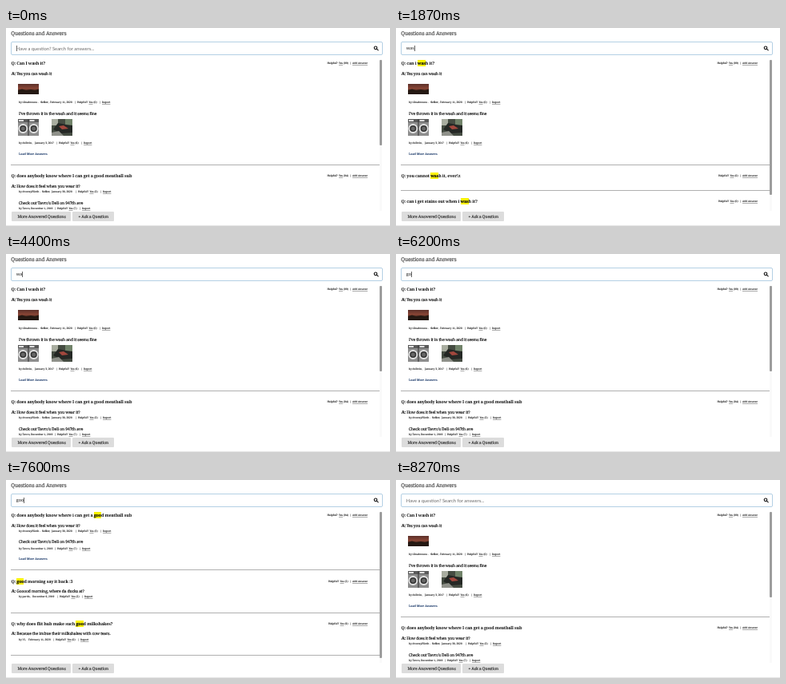
Recreate the animation shown at these times as an HTML page. Size 480x248 px, loop 8540 ms.

```html
<!DOCTYPE html>
<html lang="en">
<head>
<meta charset="utf-8">
<title>Questions and Answers</title>
<style>
html, body { margin: 0; width: 100%; height: 100%; overflow: hidden; background: #fff; }
#stage { position: relative; width: 480px; height: 248px; overflow: hidden; text-rendering: geometricPrecision; }
#stage div, #stage p, #stage svg { position: absolute; margin: 0; }
p { white-space: pre; line-height: 8px; font: 400 5px/8px "Noto Serif", serif; letter-spacing: -.12px; color: #111; }
p.title { font-size: 6.5px; letter-spacing: -.16px; color: #555; -webkit-text-stroke: .22px #555; }
p.q, p.a b { font-weight: 600; font-size: 5.4px; letter-spacing: -.16px; }
p.a { -webkit-text-stroke: .16px #111; }
p.m { font-size: 3.25px; letter-spacing: 0; color: #111; -webkit-text-stroke: .08px #111; }
p.load { font-size: 3.75px; letter-spacing: 0; color: #23406f; -webkit-text-stroke: .14px #23406f; }
u { text-decoration: underline .35px #aaa; text-underline-offset: .7px; text-decoration-skip-ink: none; }
mark { background: #fbf300; color: inherit; -webkit-text-stroke: .15px #111; }
#box { left: 6px; top: 17px; width: 463px; height: 15px; border: 1px solid #b4d0e4; border-radius: 2px; }
#field { left: 12.8px; top: 21.6px; font: 5.82px/8px Lato, sans-serif; letter-spacing: 0; color: #222; }
#caret { display: inline-block; width: .8px; height: 7px; margin-right: -.8px; vertical-align: -1.5px; background: #666; }
#hint { color: #666; }
#list { left: 0; top: 0; width: 480px; height: 229px; overflow: hidden; }
.rule { left: 6px; width: 461px; height: 1px; background: #b0b0b0; }
#track { left: 467px; top: 40px; width: 3px; height: 189px; background: #fafafa; }
#thumb { width: 3px; background: #9d9d9d; border-radius: 1px; }
.btn { top: 230px; height: 12px; background: #dcdcdc; border-radius: 1px; }
.btn p { left: 7.5px; top: 2.6px; color: #333; -webkit-text-stroke: .16px #333; }
#floor { left: 0; top: 247px; width: 480px; height: 1px; background: #e6e6e6; }
</style>
</head>
<body>
<div id="stage">
  <p class="title" style="left:6.3px;top:2.5px">Questions and Answers</p>
  <div id="box"></div>
  <p id="field"><span id="typed"></span><i id="caret"></i><span id="hint">Have a question? Search for answers...</span></p>
  <svg style="left:459px;top:22px" width="8" height="8" fill="none" stroke="#111" stroke-width="1.1" stroke-linecap="round">
    <circle cx="3" cy="2.8" r="1.8"/><path d="M4.4 4.2 6.2 5.9"/>
  </svg>
  <div id="list"></div>
  <div id="track"><div id="thumb"></div></div>
  <div class="btn" style="left:7px;width:74px"><p>More Answered Questions</p></div>
  <div class="btn" style="left:83px;width:52px"><p>+ Ask a Question</p></div>
  <div id="floor"></div>
</div>
<script>
const LOOP = 8540;
const $ = id => document.getElementById(id);

// time, typed text, caret visible
const steps = [
  [0, "", 1], [330, "", 0], [870, "", 1],
  [1330, "w", 1], [1600, "wa", 1], [1870, "was", 1], [2130, "wash", 1],
  [2600, "wash", 0], [3070, "wash", 1], [3600, "wash", 0], [4070, "wash", 1],
  [4200, "was", 1], [4400, "wa", 1], [4530, "w", 1], [4600, "", 1],
  [5070, "", 0], [5600, "", 1],
  [6070, "g", 1], [6200, "go", 1], [6400, "goo", 1], [6600, "good", 1],
  [7070, "good", 0], [7530, "good", 1],
  [7600, "goo", 1], [7670, "go", 1], [7730, "g", 1], [7800, "", 1], [8270, "", 0]
];

// y is the middle of the line
const text = (x, y, cls, html) => `<p class="${cls}" style="left:${x}px;top:${y - 4}px">${html}</p>`;
const rule = y => `<div class="rule" style="top:${y}px"></div>`;
const load = y => text(16, y, "load", "Load More Answers");

const votes = (x, y, n) => text(x, y, "m", "Helpful?") +
  text(x + 14.5, y, "m", "<u>Yes</u>") + text(x + 20.5, y, "m", `(${n})`);

function question(y, words, n, query) {
  const shown = query ? words.replace(query, "<mark>$&</mark>") : words;
  return text(6.5, y, "q", "Q: " + shown) + votes(n > 9 ? 401.5 : 403, y, n) +
    text(430, y, "m", "|") + text(433, y, "m", "<u>Add Answer</u>");
}

const answer = (y, words) => text(6.7, y, "a", "<b>A:</b> " + words);
const reply = (y, words) => text(16, y, "a", words);

const meta = (y, who, dateX, date, barX, n, seller) => text(16, y, "m", "by " + who) +
  (seller ? text(seller, y, "m", "<b>Seller</b>,") : "") +
  text(dateX, y, "m", date) + text(barX, y, "m", "|") + votes(barX + 3, y, n) +
  text(barX + 31, y, "m", "|") + text(barX + 34, y, "m", "<u>Report</u>");

const photo = (x, y, h, art) =>
  `<svg style="left:${x}px;top:${y}px" width="26" height="${h}" viewBox="0 0 26 ${h}">${art}</svg>`;
const block = (x, y, w, h, fill) => `<rect x="${x}" y="${y}" width="${w}" height="${h}" fill="${fill}"/>`;
const drum = (x, y, r) =>
  `<circle cx="${x}" cy="${y}" r="${r}" fill="#333" stroke="#e4e4e4" stroke-width="1.8"/>` +
  `<circle cx="${x}" cy="${y}" r="${r * .5}" fill="#666"/>`;

const sunset = '<defs><linearGradient id="dusk" x2="0" y2="1"><stop stop-color="#5c302a"/>' +
  '<stop offset=".45" stop-color="#8a4636"/><stop offset=".7" stop-color="#3d211a"/>' +
  '<stop offset="1" stop-color="#1d1512"/></linearGradient></defs>' + block(0, 0, 26, 13, "url(#dusk)") +
  '<path d="M0 8 5 6.5 10 8 16 7 21 8 26 6.5V13H0z" fill="#241812"/>';
const machines = block(0, 0, 26, 21, "#8d8d8d") + block(0, 0, 26, 4, "#5a5a5a") +
  block(1, 1, 6, 2, "#ddd") + block(14.5, 1, 6, 2, "#ddd") +
  block(12.5, 0, 1, 21, "#333") + drum(6.3, 12, 5) + drum(19.7, 12, 5);
const laundry = block(0, 0, 26, 21, "#454c42") + block(0, 0, 8, 8, "#a9ada0") + block(17, 0, 9, 8, "#71836a") +
  '<path d="M2 13 8 5 18 7 26 8V17L12 18z" fill="#252825"/>' +
  '<path d="M9 9 15 8 21 12 13 13z" fill="#a4483e"/><path d="M0 17 9 15 15 21H0z" fill="#8f918a"/>';

const washItem = (words, query) => question(44, words, 99, query) +
  answer(56.6, "Yes you can wash it") + photo(15, 70, 13, sunset) +
  meta(93, "tilnabroune -", 55, "February 11, 2020", 86, 0, 43.2) +
  reply(107.6, "I've thrown it in the wash and it seems fine") +
  photo(15, 114, 21, machines) + photo(57, 114, 21, laundry) +
  meta(143.5, "dolbrin,", 36, "January 3, 2017", 63, 6) + load(158.8) + rule(171);

const subReplies = (a, m1, b, m2) => answer(a, "How does it feel when you wear it?") +
  meta(m1, "drowsyPlinth -", 57, "January 30, 2020", 87, 3, 45) +
  reply(b, "Check out Tavro's Deli on 947th ave") +
  meta(m2, "Tavro,", 31, "December 1, 2019", 61, 7);

const views = {
  all: () => [107, washItem("Can I wash it?") +
    question(185, "does anybody know where I can get a good meatball sub", 94) +
    subReplies(197.6, 204.5, 219.6, 226)],
  w: query => [169, washItem("can i wash it?", query) +
    question(184.5, "you cannot wash it, ever!z", 0, query) + rule(203) +
    question(216.5, "can i get stains out when i wash it?", 0, query)],
  g: query => [183, question(44, "does anybody know where i can get a good meatball sub", 94, query) +
    subReplies(56.6, 63.5, 77.6, 85.5) + load(99.8) + rule(112) +
    question(126.5, "good morning say it back :3", 2, query) +
    answer(139, "Gooood morning, where da ducks at?") +
    meta(146, "perdo,", 33, "December 6, 2019", 64, 2) + rule(166) +
    question(180, "why does flit hub make such good milkshakes?", 9, query) +
    answer(192.3, "Because the imbue their milkshakes with cow tears.") +
    meta(199.5, "Vi,", 28, "February 11, 2020", 59, 0) + rule(219)]
};

let lastQuery = null;

function showList(query) {
  if (query === lastQuery) return;
  lastQuery = query;
  const [thumb, html] = views[query ? query[0] : "all"](query);
  $("list").innerHTML = html;
  $("thumb").style.height = thumb + "px";
}

function draw() {
  const t = performance.now() % LOOP;
  const [, typed, caret] = steps.findLast(s => s[0] <= t);
  $("typed").textContent = typed;
  $("caret").style.opacity = caret;
  $("hint").style.display = typed ? "none" : "";
  showList(typed.length > 2 ? typed : "");
  requestAnimationFrame(draw);
}
draw();
</script>
</body>
</html>
```
